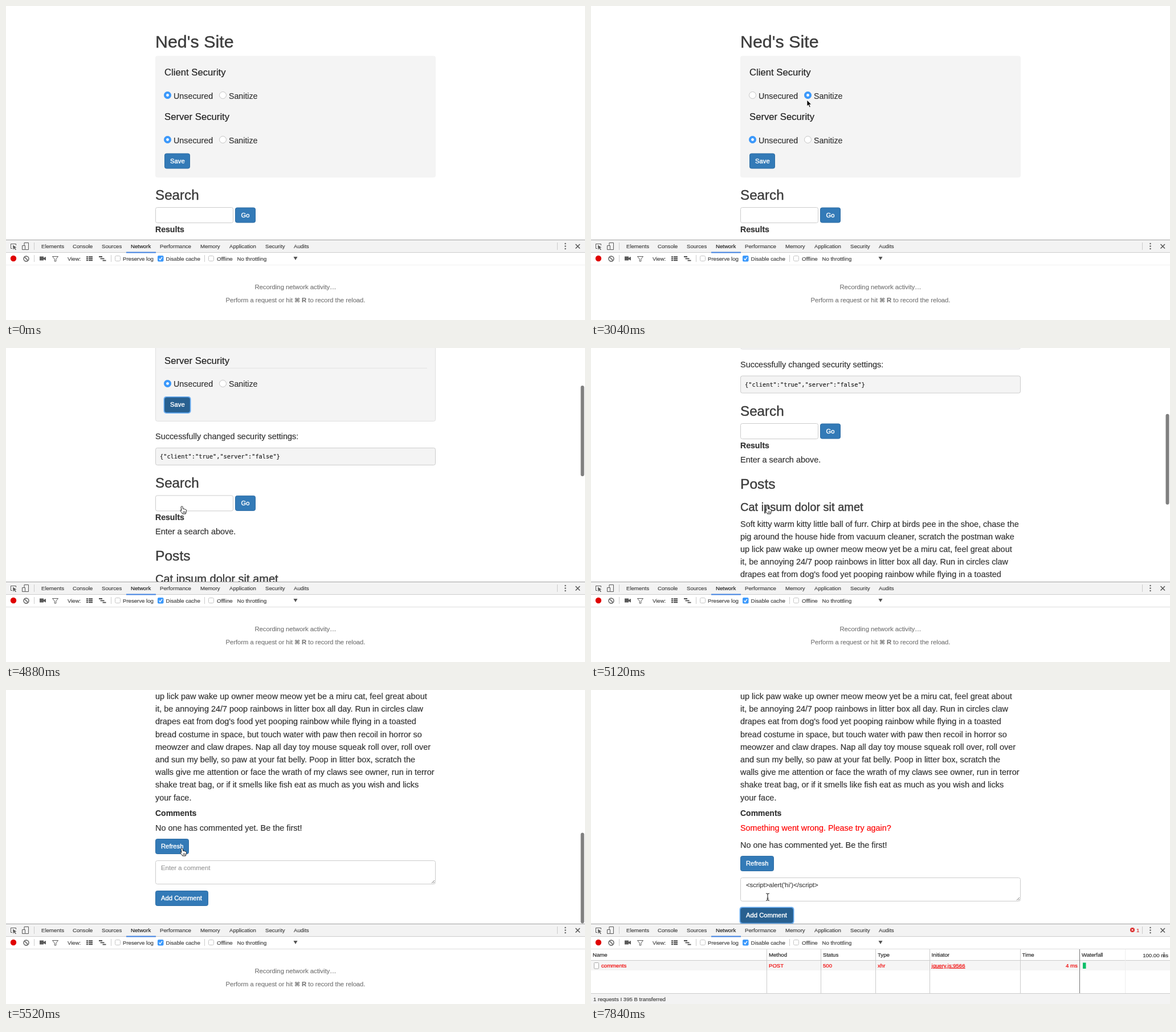
Write an HTML page that moves like this. It is 1016 px wide and 551 px high and loops after 8000 ms.

```html
<!DOCTYPE html>
<html lang="en">
<head>
<meta charset="utf-8">
<title>Site security demo</title>
<style>
html, body { margin: 0; width: 100%; height: 100%; overflow: hidden; background: #fff; }
svg { display: block; width: 1016px; height: 551px; font-family: "Liberation Sans", Arial, sans-serif; }
text { fill: currentColor; stroke: currentColor; stroke-width: .18px; }
.medium { stroke-width: .4px; }
.mono { font-family: "DejaVu Sans Mono", monospace; }
</style>
</head>
<body>
<svg id="stage" viewBox="0 0 1016 551"></svg>
<script>
const LOOP = 8000, STEP = 80;
const SAVED = 3760, FOCUS = 6640, PASTE = 7040, SUBMIT = 7680, FAILED = 7760;
const BODY = 14.45, RED = '#f00000';

const text = (x, y, s, size = BODY, color = '#333', extra = '') =>
  `<text x="${x}" y="${y}" font-size="${size}" color="${color}" ${extra}>${s}</text>`;
const heading = (x, y, s, size) => text(x, y, s, size, '#3c3c3c', 'class="medium"');
const rect = (x, y, w, h, fill, extra = '') =>
  `<rect x="${x}" y="${y}" width="${w}" height="${h}" fill="${fill}" ${extra}/>`;
const path = (d, stroke = '#5a5a5a', fill = 'none', extra = '') =>
  `<path d="${d}" stroke="${stroke}" fill="${fill}" ${extra}/>`;
const group = (id, body, extra = '') => `<g id="${id}" ${extra}>${body}</g>`;

const button = (id, x, y, w, label, tx) => group(id,
  rect(x - .5, y - .5, w + 1, 28, 'none', 'class="ring" rx="3.5" stroke="#6fb1f5" stroke-width="2"') +
  rect(x + .5, y + .5, w - 1, 26, '#337ab7', 'class="face" rx="3" stroke="#2e6da4"') +
  text(tx, y + 17, label, 11.25, '#fff', 'class="medium"'));

const radio = (id, x, y) =>
  `<circle cx="${x}" cy="${y}" r="6" fill="#fff" stroke="#c4c4c4"/>` +
  group(id, `<circle cx="${x}" cy="${y}" r="6.5" fill="#3b99fc"/><circle cx="${x}" cy="${y}" r="2.4" fill="#fff"/>`);

const choices = (name, y) =>
  radio(name + 'Off', 283.5, y) + text(294, y + 6, 'Unsecured', 14.3) +
  radio(name + 'On', 380.5, y) + text(391, y + 6, 'Sanitize', 14.2);

const post = [
  'Soft kitty warm kitty little ball of furr. Chirp at birds pee in the shoe, chase the',
  'pig around the house hide from vacuum cleaner, scratch the postman wake',
  'up lick paw wake up owner meow meow yet be a miru cat, feel great about',
  'it, be annoying 24/7 poop rainbows in litter box all day. Run in circles claw',
  "drapes eat from dog's food yet pooping rainbow while flying in a toasted",
  'bread costume in space, but touch water with paw then recoil in horror so',
  'meowzer and claw drapes. Nap all day toy mouse squeak roll over, roll over',
  'and sun my belly, so paw at your fat belly. Poop in litter box, scratch the',
  'walls give me attention or face the wrath of my claws see owner, run in terror',
  'shake treat bag, or if it smells like fish eat as much as you wish and licks',
  'your face.'
];

const settings =
  heading(262, 73, "Ned's Site", 30.4) +
  rect(262.5, 88, 491, 212.5, '#f4f4f4', 'id="well" rx="3"') +
  text(278, 122, 'Client Security', 16.7, '#222') + choices('client', 156.5) +
  text(278, 200, 'Server Security', 16.7, '#222') + choices('server', 234.5) +
  group('rules', path('M278 129.5H739M278 207.5H739', '#e3e3e3')) +
  button('save', 278, 258.5, 45, 'Save', 288) +
  group('message', text(262, 332.5, 'Successfully changed security settings:') +
    rect(262.5, 347.5, 491, 30, '#f4f4f4', 'rx="3" stroke="#ccc"') +
    text(270, 366, '{"client":"true","server":"false"}', 10.3, '#222', 'class="mono"'));

const form =
  button('refresh', 262, 824, 59, 'Refresh', 272) +
  rect(261.5, 861.5, 493, 43, 'none', 'id="glow" rx="4" stroke="#d3e8f8" stroke-width="2"') +
  rect(262.5, 862.5, 491, 41, '#fff', 'id="area" rx="3"') +
  path('M747 902l5-5M750 902l2-2', '#777') +
  text(272, 879, '', 11.35, '#999', 'id="entry"') +
  rect(272, 869, 1, 13, '#222', 'id="caret"') +
  button('add', 262, 915, 93, 'Add Comment', 272);

const lower =
  heading(262, 340, 'Search', 24.2) +
  rect(262.5, 353.5, 136, 27, '#fff', 'rx="3" stroke="#ccc"') +
  button('go', 402, 353.5, 36, 'Go', 412.5) +
  text(262, 397, 'Results', 14.1, '#333', 'font-weight="bold"') +
  text(262, 422, 'Enter a search above.') +
  heading(262, 468, 'Posts', 24.6) +
  heading(262, 507, 'Cat ipsum dolor sit amet', 20) +
  post.map((s, i) => text(262, 534.5 + 22.22 * i, s)).join('') +
  text(262, 783.5, 'Comments', 14, '#333', 'font-weight="bold"') +
  text(262, 810, 'Something went wrong. Please try again?', 14.35, '#f00', 'id="error"') +
  group('tail', text(262, 810, 'No one has commented yet. Be the first!') + form);

const small = (x, y, s, color = '#444', extra = '') => text(x, y, s, 9.6, color, extra);
const tabs = [[62, 'Elements'], [117, 'Console'], [168, 'Sources'], [219, 'Network'], [270, 'Performance'],
  [341, 'Memory'], [392, 'Application'], [455, 'Security'], [505, 'Audits']];
const checkbox = x => rect(x + .5, 438.5, 9, 9, '#fff', 'rx="2" stroke="#c4c4c4"');

const toolbar =
  rect(0, 410, 1016, 141, '#fff') + rect(0, 410, 1016, 22, '#f3f3f3') +
  path('M0 410.5H1016', '#a3a3a3') + path('M0 432.5H1016', '#ccc') +
  path('M0 454.5H1016', '#f0f0f0', 'none', 'id="barLine"') +
  path('M49.5 415V428M967.5 415V428M49.5 437V449M184.5 437V449M348.5 437V449', '#ccc') +
  rect(211, 431.5, 52, 2, '#3f80e0') +
  tabs.map(([x, s]) => small(x, 425, s, s === 'Network' ? '#222' : '#444')).join('') +
  path('M11 425.5H8.5V417.5H17.5V420') + path('M12 419.5l6.5 4.2-3 .6 2.5 3-1.2 1-2.4-3-1.7 2.4z', 'none', '#5a5a5a') +
  path('M32 420V415.5H39.5V427.5H34M28.5 420.5H33.5V427.5H28.5z') +
  [417, 421.5, 426].map(y => `<circle cx="981.5" cy="${y}" r="1.2" fill="#5a5a5a"/>`).join('') +
  path('M999.5 418l7.5 7.5M1007 418l-7.5 7.5', '#555', 'none', 'stroke-width="1.5"') +
  '<circle cx="13" cy="443" r="5.2" fill="#e00000"/>' +
  '<circle cx="35.5" cy="443.5" r="4.5" fill="none" stroke="#5a5a5a" stroke-width="1.4"/>' +
  path('M32.5 440.5l6 6', '#5a5a5a', 'none', 'stroke-width="1.4"') +
  path('M59 439.5h7v2.5l4-2v6.5l-4-2v2h-7z', 'none', '#5a5a5a') +
  path('M81.5 439.5h10l-3.7 4.5v4h-2.6v-4z') +
  small(108, 446.5, 'View:') +
  path('M141 440.2h3M145 440.2h7M141 443.2h3M145 443.2h7M141 446.2h3M145 446.2h7', '#4a4a4a', 'none', 'stroke-width="1.9"') +
  path('M163 440h6M165.5 443.3h7M169.5 446.7h6', '#4a4a4a', 'none', 'stroke-width="1.8"') +
  checkbox(191) + small(205, 446.5, 'Preserve log') +
  rect(266, 438, 10.5, 10.5, '#3b99fc', 'rx="2"') +
  path('M268.5 443.3l2 2.3 3.5-5', '#fff', 'none', 'stroke-width="1.4"') + small(280.5, 446.5, 'Disable cache') +
  checkbox(355) + small(370, 446.5, 'Offline') + small(405.5, 446.5, 'No throttling') +
  path('M504.5 440h7l-3.5 6z', 'none', '#555');

const idle =
  text(508, 497, 'Recording network activity…', 11.3, '#777', 'text-anchor="middle"') +
  text(508, 519.5, 'Perform a request or hit <tspan font-weight="bold"><tspan font-family="DejaVu Sans, sans-serif" font-size="10.5">⌘</tspan> R</tspan> to record the reload.',
    11.2, '#777', 'text-anchor="middle"');

const columns = [[3, 'Name', 18, 'comments'], [312, 'Method', 312, 'POST'], [407, 'Status', 407, '500'],
  [503, 'Type', 503, 'xhr'], [597.5, 'Initiator', 597.5, 'jquery.js:9566'], [756.5, 'Time', 833, '4 ms'], [861, 'Waterfall', 0, '']];
const requests =
  rect(0, 475, 1016, 17, '#f5f5f5') +
  path('M0 474.5H1016M308.5 455V532M403.5 455V532M499.5 455V532M594.5 455V532M753.5 455V532', '#ccc') +
  path('M937.5 455V532', '#eee') + path('M857.5 455V532', '#777') +
  columns.map(([hx, h, x, s]) => small(hx, 467.5, h, '#222') +
    small(x, 486.8, s, RED, h === 'Initiator' ? 'text-decoration="underline"' : '')).join('') +
  small(1013, 468.5, '100.00 ms', '#333', 'text-anchor="end"') + path('M1005.5 460V469', '#555') +
  rect(5.5, 478.5, 8, 10.5, '#fff', 'rx="1" stroke="#aaa"') +
  rect(863, 478.5, 5.5, 10.5, '#0cbf68') +
  rect(0, 532, 1016, 19, '#f3f3f3') + path('M0 532.5H1016', '#ccc') +
  small(4, 546, '1 requests I 395 B transferred') +
  '<circle cx="950" cy="421" r="4" fill="#dc2f2f"/>' + path('M948.5 419.5l3 3M951.5 419.5l-3 3', '#fff') +
  small(957, 425, '1', '#dc2f2f');

const pointers =
  group('arrow', path('M0 0V10.8L2.5 8.6L4.3 12.8L6.2 12L4.4 7.9H7.8z', '#fff', '#000', 'stroke-width=".8"')) +
  group('hand', path('M-1 0C.3-.8 1 .2 1.2 1.4L1.8 4.6C3 3.8 3.8 4.4 4 5C5 4.4 5.7 5 5.9 5.7C7 5.3 7.6 6 7.6 7.2C7.7 9.4 6.8 10.4 6.3 13H.6C0 11.2-2.4 9.2-3.2 7.4C-3.3 6.2-2 6-1 7.4L-1.9 1.5C-2 .8-1.7.2-1 0z', '#111', '#fff') +
    path('M2 8.5v3M3.6 8.5v3M5.2 8.5v3', '#111', 'none', 'stroke-width=".7"')) +
  group('beam', path('M-3-6C-1-6 0-5.5 0-4.5C0-5.5 1-6 3-6M0-4.5V4.5M-3 6C-1 6 0 5.5 0 4.5C0 5.5 1 6 3 6M-1.5 2.5H1.5', '#222', 'none', 'stroke-width="1.1"'));

document.getElementById('stage').innerHTML =
  group('page', settings + group('lower', lower)) +
  rect(1008.5, 0, 6, 159, '#7f7f7f', 'id="thumb" rx="3"') +
  toolbar + group('idle', idle) + group('requests', requests) + group('pointer', pointers);

const $ = id => document.getElementById(id);
const set = (id, name, value) => $(id).setAttribute(name, value);
const show = (id, on) => set(id, 'display', on ? 'inline' : 'none');
const shift = (id, x, y) => set(id, 'transform', `translate(${x} ${y})`);

// Each key is [time, ...values], joined by straight segments.
function along(keys, t) {
  const i = keys.findIndex(k => k[0] > t);
  if (i === 0) return keys[0].slice(1);
  if (i < 0) return keys[keys.length - 1].slice(1);
  const a = keys[i - 1], b = keys[i], u = (t - a[0]) / (b[0] - a[0]);
  return a.slice(1).map((v, n) => v + (b[n + 1] - v) * u);
}

const pointerKeys = [[1040, 322, 4], [1280, 344, 62], [1520, 366, 126], [1840, 380, 158], [1920, 379, 157],
  [2960, 379, 157], [3040, 379, 165], [3280, 340, 222], [3440, 318, 262], [3600, 309, 278],
  [6000, 309, 278], [6240, 311, 297], [6560, 314, 320], [7280, 314, 320], [7600, 310, 363]];
const scrollKeys = [[4480, 0], [4560, 24], [4800, 130], [5120, 298.5], [5280, 480], [5360, 565], [5440, 622], [5520, 640.5]];
const pointerShapes = [[7760, 'beam'], [7520, 'hand'], [6320, 'beam'], [6160, 'arrow'], [3440, 'hand'], [1040, 'arrow']];

function press(id, on) {
  const g = $(id);
  g.querySelector('.ring').setAttribute('display', on ? 'inline' : 'none');
  g.querySelector('.face').setAttribute('fill', on ? '#286090' : '#337ab7');
}

function draw(t) {
  const saved = t >= SAVED, failed = t >= FAILED, pasted = t >= PASTE;
  const focused = t >= FOCUS && t < SUBMIT;
  const [scroll] = along(scrollKeys, t), [x, y] = along(pointerKeys, t);

  shift('page', 0, -scroll);
  shift('lower', 0, saved ? 77.5 : 0);
  shift('tail', 0, failed ? 30 : 0);
  set('thumb', 'y', .394 * scroll - 1.8);
  set('thumb', 'opacity', t < 4560 ? 0 : along([[6000, 1], [6240, 0]], t)[0]);

  show('clientOff', t < 2720);
  show('clientOn', t >= 2720);
  show('serverOff', true);
  show('serverOn', false);
  show('message', saved);
  show('rules', saved);
  set('well', 'stroke', saved ? '#e0e0e0' : '#f4f4f4');
  set('barLine', 'stroke', saved ? '#ddd' : '#f0f0f0');
  press('save', saved);
  press('go', false);
  press('refresh', false);
  press('add', t >= SUBMIT);

  show('glow', focused);
  set('area', 'stroke', focused ? '#66afe9' : '#ccc');
  show('caret', focused);
  set('caret', 'x', pasted ? 400 : 272);
  $('entry').textContent = pasted ? "<script>alert('hi')<\/script>" : 'Enter a comment';
  set('entry', 'color', pasted ? '#444' : '#999');
  show('error', failed);
  show('idle', !failed);
  show('requests', failed);

  const shape = (pointerShapes.find(p => t >= p[0]) || [])[1];
  ['arrow', 'hand', 'beam'].forEach(id => show(id, id === shape));
  shift('pointer', x, y);
}

const start = performance.now();
function tick() {
  const t = (performance.now() - start) % LOOP;
  draw(Math.floor(t / STEP) * STEP);
  requestAnimationFrame(tick);
}
tick();
</script>
</body>
</html>
```
